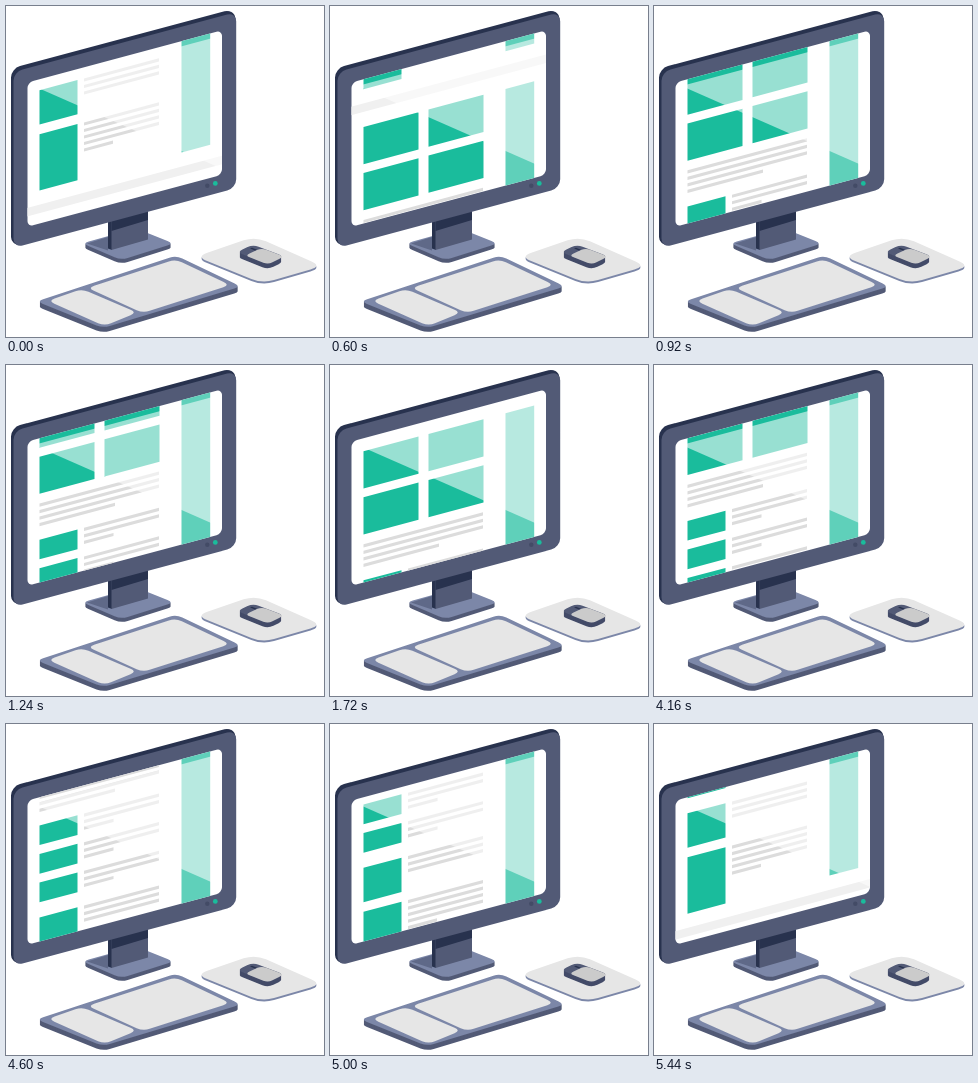
Animation, 318 px wide and 331 px high, one loop 5480 ms. Source, as an HTML page:

```html
<!DOCTYPE html>
<html lang="en">
<head>
<meta charset="utf-8">
<title>Scrolling page on a desktop computer</title>
<style>
  html, body { margin: 0; width: 100%; height: 100%; overflow: hidden; background: #fff; }
  svg { display: block; width: 318px; height: 331px; }
</style>
</head>
<body>
<svg viewBox="0 0 318 331" width="318" height="331">
  <defs>
    <clipPath id="glass"><rect x="21.5" y="73.4" width="194.5" height="144.3" rx="5.5"/></clipPath>
    <g id="page"></g>
  </defs>
  <g id="desk"></g>
  <g transform="matrix(1 -.268 0 1 0 8.84)">
    <rect x="5" y="55" width="222.5" height="177.5" rx="9" fill="#28324e"/>
    <rect x="6" y="56.2" width="223.5" height="177.5" rx="9" fill="#28324e"/>
    <rect x="7.5" y="59" width="222.7" height="176" rx="9" fill="#525a76"/>
    <rect x="21.5" y="73.4" width="194.5" height="144.3" rx="5.5" fill="#fff"/>
    <g clip-path="url(#glass)">
      <g id="scroll">
        <use href="#page"/>
        <use href="#page" y="359"/>
      </g>
      <path d="M27.6 78.5H217V212.6Z" fill="#fff" opacity=".55"/>
    </g>
  </g>
  <circle cx="201.3" cy="179.7" r="2.2" fill="#434b66"/>
  <circle cx="209.3" cy="177.4" r="2.4" fill="#1abc9c"/>
</svg>
<script>
const NS = 'http://www.w3.org/2000/svg';
const TEAL = '#1abc9c', LINE = '#dcdcdc', STEEL = '#7c87a8', SLATE = '#525a76', NAVY = '#28324e', PALE = '#e6e6e6';
const PAGE = 359;
const byId = id => document.getElementById(id);

function add(parent, tag, attrs) {
  const el = document.createElementNS(NS, tag);
  for (const name in attrs) el.setAttribute(name, attrs[name]);
  parent.appendChild(el);
}

// ---- page content, y measured from the first row of tiles ----
const page = byId('page');
const box = (x, y, width, height, fill) => add(page, 'rect', { x, y, width, height, fill });

function lines(x, y, count, shortEnd = 153) {
  for (let i = 0; i < count; i++) {
    const end = i === count - 1 ? shortEnd : 153;
    box(x, y + i * 6.5 - 1.6, end - x, 3.2, LINE);
  }
}

function article(y, height, count, shortEnd) {
  box(33.5, y, 38, height, TEAL);
  lines(78, y + 1.7, count, shortEnd);
}

for (const y of [0, 46]) for (const x of [33.5, 98.5]) box(x, y, 55, 37.2, TEAL);
lines(33.5, 94.5, 4, 109);
for (let i = 0; i < 3; i++) article(129 + i * 28.6, 19.7, 3, 107.5);
article(221, 34.3, 3);
article(265, 56.3, 5, 107);
box(175.5, 0, 28.7, 321.3, '#5fd0ba');
box(20, 335.5, 198, 8.5, '#f0f0f0');

// ---- stand, keyboard, mouse and pad ----
const desk = byId('desk');

// Outline through the given corners, each one cut back and rounded
function outline(corners, cut) {
  const pts = corners.split(' ').map(p => p.split(',').map(Number));
  const toward = ([x, y], [X, Y]) => {
    const f = cut / Math.hypot(X - x, Y - y);
    return `${x + (X - x) * f} ${y + (Y - y) * f}`;
  };
  return pts.map((p, i) => {
    const prev = pts.at(i - 1), next = pts[(i + 1) % pts.length];
    return `${i ? 'L' : 'M'}${toward(p, prev)}Q${p.join(' ')} ${toward(p, next)}`;
  }).join('') + 'Z';
}

function poly(corners, fill, cut = 0, dy = 0) {
  add(desk, 'path', { d: outline(corners, cut), fill, transform: `translate(0 ${dy})` });
}

function slab(corners, top, side, cut, depth) {
  for (let d = depth; d > 0; d--) poly(corners, side, cut, d);
  poly(corners, top, cut);
}

slab('76,237.3 130,222.5 168,237.5 115,254', STEEL, SLATE, 7, 4);
poly('81,237.5 102,231 102,244.5', '#5f6988');
poly('102,210 106,210 106,244 102,242.5', NAVY);
poly('105.5,210 142,200 142,233.5 105.5,244', SLATE);
poly('105.5,210 142,200 142,214 105.5,225', NAVY);

slab('30.5,295.5 170,249.5 235,280.5 97,322', STEEL, SLATE, 7, 5);
poly('42,294.8 76,283 131,306.5 98.5,320', PALE, 7);
poly('81.5,282 169.5,253.3 224,279 137,307', PALE, 7);

slab('190,250.5 249,230.5 316,260 256.5,277.5', PALE, STEEL, 12, 2);

slab('231,246 247,238.5 278,250.5 262,258.5', SLATE, '#434b68', 6, 5);
poly('239,249.5 255.5,242 278,250.5 262,258.5', '#cbcbcb', 5);
poly('244,242.5 246,241.7 251,243.7 249,244.5', NAVY);

// ---- scrolling: steady for half the way, then it swings past and back ----
const LOOP = 5480, STEP = 40, REST = 1720, RESUME = 3720, HALF = 44, RUN = 218;

function distance(k) {
  const u = Math.max(0, k / HALF - 1);
  return RUN * k / HALF + 366 * u ** 2 - 443 * u ** 3;
}

function stepAt(t) {
  if (t < REST) return HALF + 1 + Math.floor(t / STEP);
  if (t < RESUME) return 2 * HALF;
  return 1 + Math.floor((t - RESUME) / STEP);
}

const scroll = byId('scroll');
const start = performance.now();

function draw() {
  const t = Math.max(0, performance.now() - start) % LOOP;
  const y = 86.5 - distance(stepAt(t));
  scroll.setAttribute('transform', `translate(0 ${y.toFixed(2)})`);
  requestAnimationFrame(draw);
}

byId('scroll').lastElementChild.setAttribute('y', PAGE);
draw();
</script>
</body>
</html>
```
